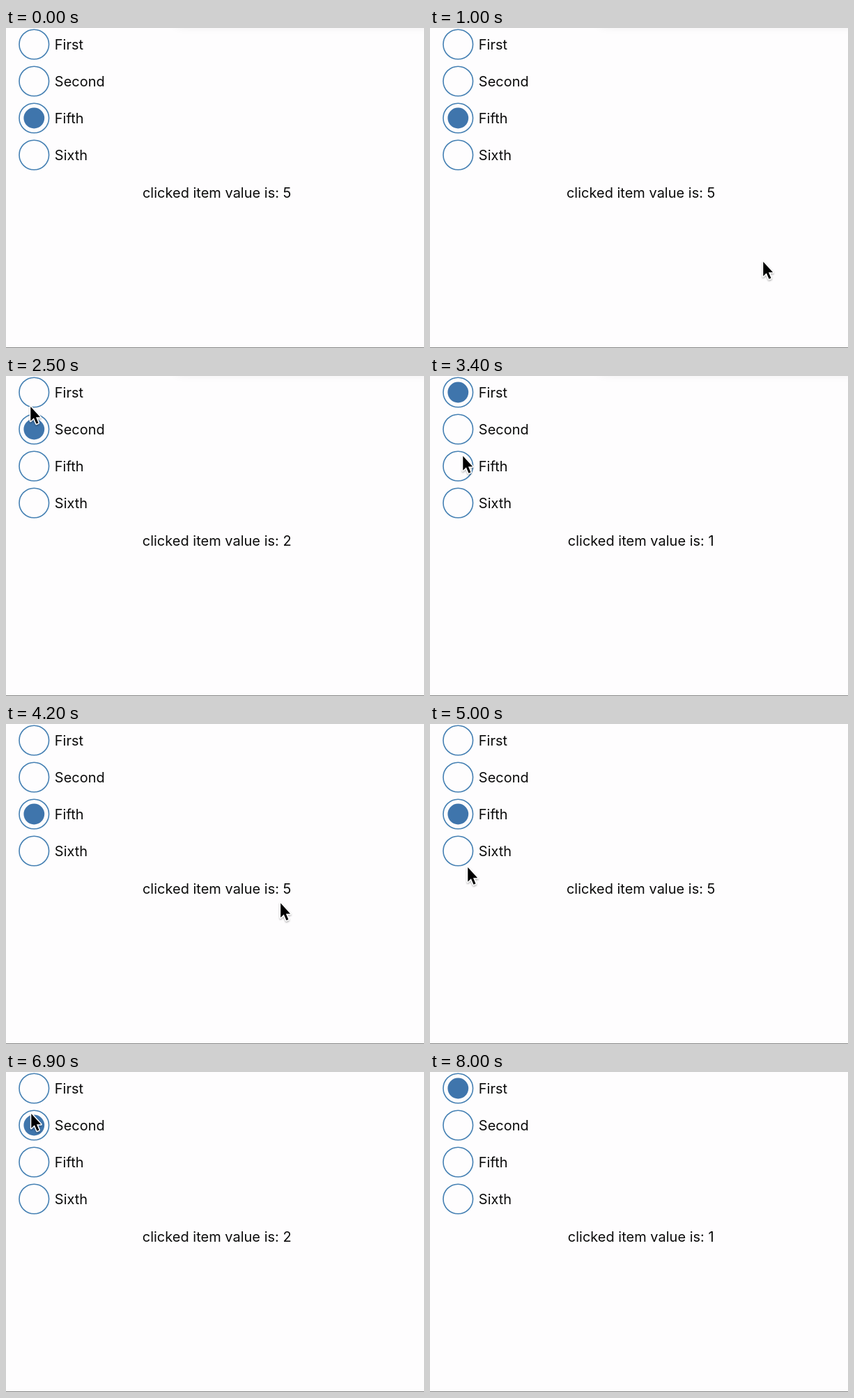
These frames come from a looping animation (600x460 px, 9.1 s). An HTML page:

```html
<!DOCTYPE html>
<html lang="en">
<head>
<meta charset="utf-8">
<title>Radio buttons</title>
<style>
  html, body { margin: 0; width: 100%; height: 100%; overflow: hidden; background: #fefdfe; }
  svg { display: block; width: 600px; height: 460px; }
  text { font: 20px Inter, Roboto, sans-serif; fill: #0b0b0b; }
</style>
</head>
<body>
<svg viewBox="0 0 600 460">
  <defs>
    <filter id="soft" x="-20%" y="-200%" width="140%" height="500%">
      <feGaussianBlur stdDeviation="9 5"/>
    </filter>
    <filter id="drop" x="-50%" y="-50%" width="200%" height="200%">
      <feDropShadow dx="0" dy="1.5" stdDeviation="1.3" flood-opacity=".35"/>
    </filter>
  </defs>
  <rect width="600" height="460" fill="#fefdfe"/>
  <rect id="shade" x="245" y="-14" width="370" height="16" opacity=".04" filter="url(#soft)"/>
  <rect y="459" width="600" height="1" fill="#858585"/>
  <g id="list"></g>
  <text id="status" x="302.7" y="244" text-anchor="middle"></text>
  <g id="cursor" filter="url(#drop)">
    <path d="M.3 1V21.8L4.9 17.3L8.6 25.7L11.5 24.4L8 16.2H14.2Z" stroke="#fff"
      stroke-width="3" stroke-linejoin="round" paint-order="stroke"/>
  </g>
</svg>
<script>
const LOOP = 9100, STEP = 100, SHOWN = 500, GONE = 8000;
const NS = "http://www.w3.org/2000/svg";
const $ = id => document.getElementById(id);

const items = [["First", 1], ["Second", 2], ["Fifth", 5], ["Sixth", 6]];

// Time of each click and the value it selects
const clicks = [[0, 5], [2000, 2], [2900, 1], [3700, 5], [5500, 6], [6200, 5], [6800, 2], [7400, 1]];

// Pointer moves: start, end, x, y reached; it rests in between
const entry = [465, 351];
const moves = [
  [500, 700, 472, 337],
  [900, 1000, 478, 335],
  [1200, 2200, 35, 78],
  [2300, 2500, 35, 43],
  [2500, 2700, 29, 16],
  [2800, 3400, 47, 114],
  [3900, 4300, 417, 266],
  [4300, 4500, 415, 244],
  [4700, 5000, 54, 205],
  [5000, 5200, 43, 176],
  [5900, 6400, 38, 89],
  [6500, 6900, 36, 59],
  [6900, 7500, 34, 20],
  [7500, 7900, 431, 2]
];

const clamp = k => Math.min(1, Math.max(0, k));
const ease = k => k < 0.5 ? 4 * k ** 3 : 1 - 4 * (1 - k) ** 3;
const show = (el, on) => el.setAttribute("visibility", on ? "visible" : "hidden");

function add(parent, tag, attrs) {
  const el = document.createElementNS(NS, tag);
  for (const key in attrs) el.setAttribute(key, attrs[key]);
  return parent.appendChild(el);
}

const dots = items.map(([name], i) => {
  const cx = 40.3, cy = 23.5 + 53 * i;
  add($("list"), "circle", { cx, cy, r: 21.3, fill: "none", stroke: "#4580b3", "stroke-width": 1.6 });
  add($("list"), "text", { x: 69.8, y: cy + 7 }).textContent = name;
  return add($("list"), "circle", { cx, cy, r: 14.9, fill: "#3f75ac" });
});

function pointerAt(t) {
  return moves.reduce(([x, y], [from, to, nx, ny]) => {
    const k = ease(clamp((t - from) / (to - from)));
    return [x + (nx - x) * k, y + (ny - y) * k];
  }, entry);
}

function draw(ms) {
  const t = Math.floor((ms % LOOP) / STEP) * STEP;
  const value = clicks.filter(c => c[0] <= t).pop()[1];
  items.forEach((item, i) => show(dots[i], item[1] === value));
  $("status").textContent = "clicked item value is: " + value;
  show($("shade"), t < 4000);
  show($("cursor"), t >= SHOWN && t < GONE);
  $("cursor").setAttribute("transform", `translate(${pointerAt(t)})`);
}

const start = performance.now();
function tick() {
  draw(performance.now() - start);
  requestAnimationFrame(tick);
}
tick();
</script>
</body>
</html>
```
